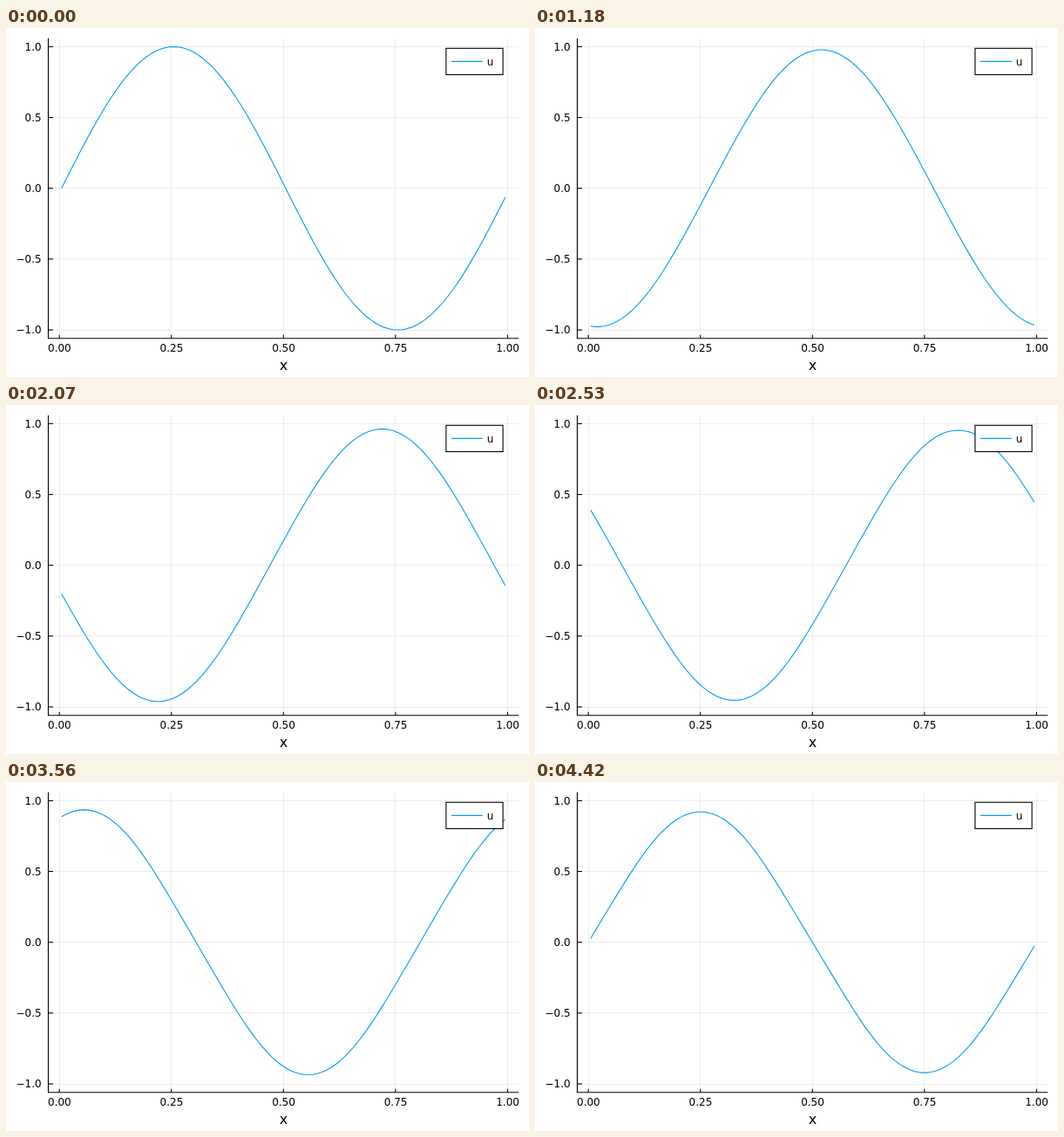
Recreate the animation shown at these times as an HTML page. Size 600 by 400 pixels, loop 4.44 s.

```html
<!DOCTYPE html>
<html lang="en">
<head>
<meta charset="utf-8">
<title>Advected wave</title>
<style>
  html, body { margin: 0; width: 100%; height: 100%; overflow: hidden; background: #fff; }
  svg { display: block; width: 600px; height: 400px; }
  text { font-family: "DejaVu Sans", sans-serif; font-size: 12px; fill: #000; }
  .grid { stroke: #000; stroke-opacity: .07; }
  .axis { stroke: #000; stroke-width: 1.1; }
  .wave { stroke: #009afa; stroke-width: 1.1; fill: none; stroke-linejoin: round; }
</style>
</head>
<body>
<svg viewBox="0 0 600 400">
  <g id="axes"></g>
  <path id="curve" class="wave"/>
  <rect x="504.9" y="23.3" width="65.2" height="30.2" fill="#fff" class="axis"/>
  <path class="wave" d="M511 38.4H546.8"/>
  <text x="551.8" y="43">u</text>
</svg>
<script>
const LOOP = 4440, FPS = 45, CELLS = 100, DT = 0.005;
const axes = document.getElementById('axes');
const curve = document.getElementById('curve');
const px = x => 61.2 + 514.2 * x;
const py = u => 183.7 - 162.3 * u;

function add(tag, attrs, label) {
  const el = document.createElementNS('http://www.w3.org/2000/svg', tag);
  for (const key in attrs) el.setAttribute(key, attrs[key]);
  if (label) el.textContent = label;
  axes.append(el);
}
const line = (cls, d) => add('path', { class: cls, d });

function drawAxes() {
  const xs = [0, 0.25, 0.5, 0.75, 1], ys = [-1, -0.5, 0, 0.5, 1];
  const snap = v => Math.floor(v) + 0.5;
  for (const x of xs) line('grid', `M${snap(px(x))} 12V355.5`);
  for (const y of ys) line('grid', `M48.5 ${snap(py(y))}H588`);
  line('axis', 'M48.5 11.7V356');
  line('axis', 'M48 355.7H588.2');
  for (const x of xs) {
    line('axis', `M${px(x)} 355.7V351.8`);
    add('text', { x: px(x) + 0.2, y: 371.2, 'text-anchor': 'middle' }, x.toFixed(2));
  }
  for (const y of ys) {
    line('axis', `M48.5 ${py(y)}H54`);
    add('text', { x: 40.6, y: py(y) + 4.4, 'text-anchor': 'end' },
      y.toFixed(1).replace('-', '\u2212'));
  }
  add('text', { x: 318.4, y: 392, 'text-anchor': 'middle', style: 'font-size:16px' }, 'x');
}

// Travelling sine that decays and slowly gains odd harmonics.
function drawWave(step) {
  const base = Math.cos(Math.PI / CELLS) ** step;
  const third = 8.8e-5 * step, fifth = 1.5e-5 * step;
  let d = '';
  for (let i = 0; i < CELLS; i++) {
    const a = 2 * Math.PI * (i / CELLS - DT * step);
    const u = base * Math.sin(a) - third * Math.sin(3 * a) - fifth * Math.sin(5 * a);
    d += `${i ? 'L' : 'M'}${px((i + 0.5) / CELLS).toFixed(2)} ${py(u).toFixed(2)}`;
  }
  curve.setAttribute('d', d);
}

// Steps run at 45 per second, rounded to hundredths of a second.
function stepAt(ms) {
  const tick = Math.floor((ms % LOOP) / 10);
  return Math.ceil((tick + 0.5) * FPS / 100) - 1;
}

function frame() {
  drawWave(stepAt(performance.now()));
  requestAnimationFrame(frame);
}

drawAxes();
frame();
</script>
</body>
</html>
```
